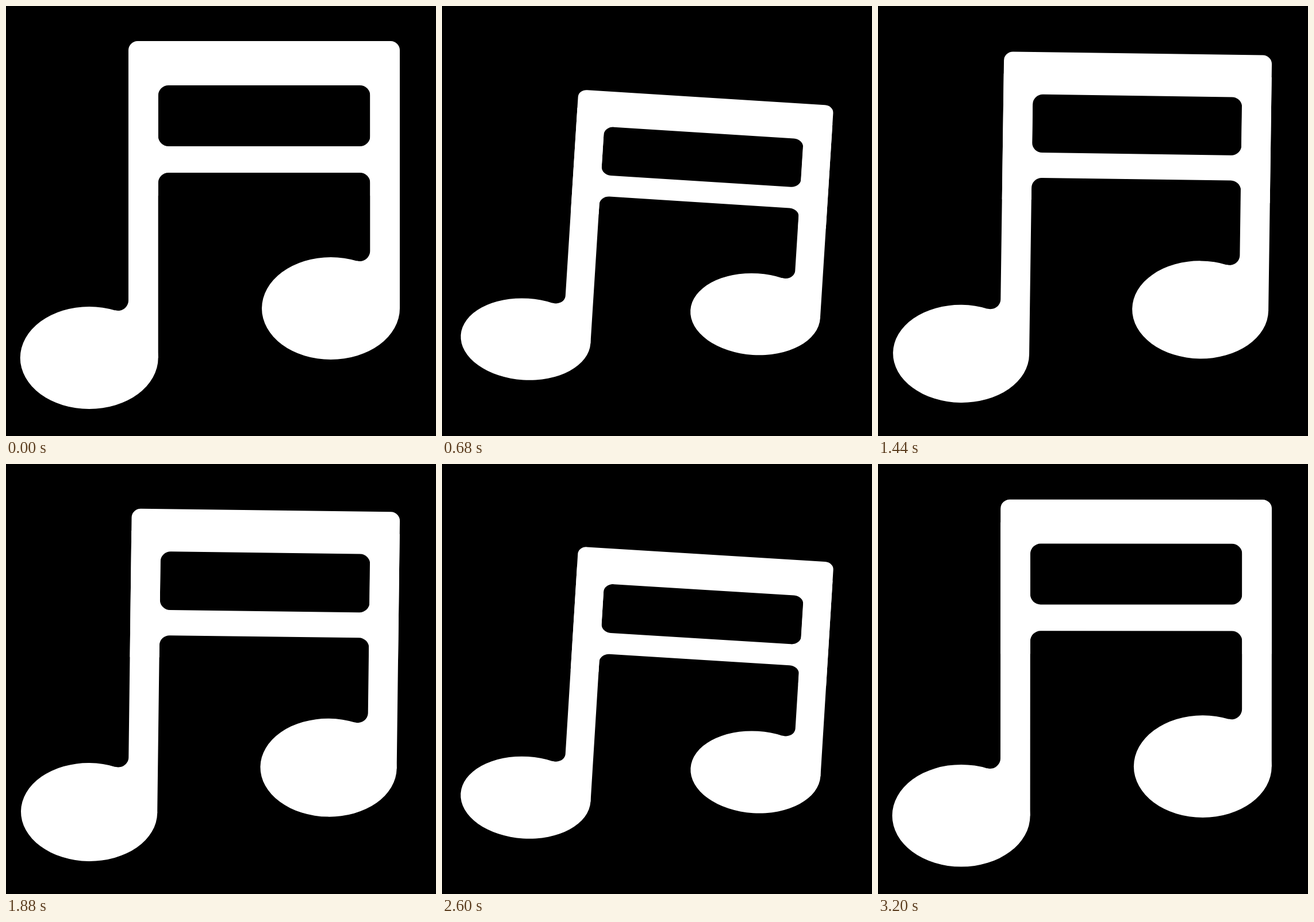
Recreate the animation shown at these times as an HTML page with a canvas. Size 748 by 748 pixels, loop 3.24 s.

```html
<!DOCTYPE html>
<html lang="en">
<head>
<meta charset="utf-8">
<title>Bouncing note</title>
<style>
  html, body { margin: 0; width: 100%; height: 100%; overflow: hidden; background: #000; }
  canvas { display: block; width: 748px; height: 748px; }
</style>
</head>
<body>
<canvas id="stage" width="748" height="748"></canvas>
<script>
const ctx = document.getElementById('stage').getContext('2d');
const SIZE = 748, LOOP = 3240, STEP = 40, HALF = 1680;
const LEFT = 213, RIGHT = 685, TOP = 61, STEM = 51.7;
const HEAD_W = 120, HEAD_H = 89, ROUND = 18;
const TURN = 4 * Math.PI / 180;

const smooth = s => s * s * (3 - 2 * s);

// Eased squash and release within one beat
const beat = (t, length, rise, fall) =>
  smooth(Math.min(1, t / rise, (length - t) / fall));

const squashAt = t => t < HALF
  ? beat(t, HALF, 840, 840)
  : beat(t - HALF, LOOP - HALF, 740, 810);

function box(color, x1, y1, x2, y2, radius) {
  ctx.fillStyle = color;
  ctx.beginPath();
  ctx.roundRect(x1, y1, x2 - x1, y2 - y1, radius);
  ctx.fill();
}

// Stem ending in an oval head, with a rounded notch where they meet
function stemAndHead(right, cy) {
  const left = right - STEM, cx = right - HEAD_W;
  const notchY = cy - HEAD_H - 11;
  ctx.fillStyle = '#fff';
  ctx.beginPath();
  ctx.moveTo(right, TOP + 40);
  ctx.lineTo(right, cy);
  ctx.lineTo(cx, cy);
  ctx.arc(left - ROUND, notchY, ROUND, 1.85, 0, true);
  ctx.lineTo(left, TOP + 40);
  ctx.fill();
  ctx.beginPath();
  ctx.ellipse(cx, cy, HEAD_W, HEAD_H, 0, 0, Math.PI * 2);
  ctx.fill();
}

function drawNote() {
  const inL = LEFT + STEM, inR = RIGHT - STEM + 0.3;
  box('#fff', LEFT, TOP, RIGHT, 330, [16, 16, 0, 0]);
  box('#000', inL, 138, inR, 244, ROUND);
  box('#000', inL, 290, inR, 400, [ROUND, ROUND, 0, 0]);
  stemAndHead(inL, 612);
  stemAndHead(RIGHT, 526);
}

function draw(t) {
  const u = squashAt(t);
  ctx.setTransform(1, 0, 0, 1, 0, 0);
  ctx.fillStyle = '#000';
  ctx.fillRect(0, 0, SIZE, SIZE);
  ctx.translate(263, 487.8);
  ctx.rotate(TURN * u);
  ctx.scale(1 - 0.064 * u, 1 - 0.224 * u);
  ctx.translate(-263, -487.8);
  drawNote();
}

const start = performance.now();
function tick() {
  const t = (performance.now() - start) % LOOP;
  draw(Math.floor(t / STEP) * STEP);
  requestAnimationFrame(tick);
}
tick();
</script>
</body>
</html>
```
